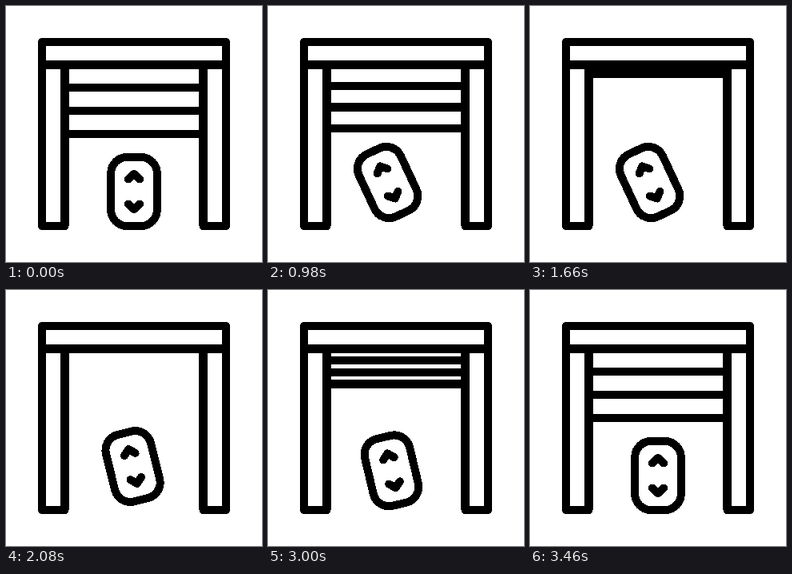
An HTML page for the animation above (3600 ms loop, 320 by 320 pixels).

```html
<!DOCTYPE html>
<html lang="en">
<head>
<meta charset="utf-8">
<title>Garage door</title>
<style>
  html, body { margin: 0; width: 100%; height: 100%; overflow: hidden; background: #fff; }
  svg { display: block; width: 100vw; height: 100vh; }
</style>
</head>
<body>
<svg viewBox="0 0 320 320" fill="none" stroke="#000" stroke-width="10.3" stroke-linecap="round" stroke-linejoin="round" shape-rendering="crispEdges">
  <g id="slats">
    <path d="M73.4 0H246.6"/>
    <path d="M73.4 0H246.6"/>
    <path d="M73.4 0H246.6"/>
  </g>
  <path d="M45 45H275V73.4H45Z"/>
  <path d="M45 73.4H73.4V275H45Z"/>
  <path d="M246.6 73.4H275V275H246.6Z"/>
  <g id="remote" stroke-width="10">
    <rect x="-28.8" y="-43" width="57.6" height="86" rx="20"/>
    <path d="M-7 -15.5L0 -22L7 -15.5M-7 15.5L0 22L7 15.5"/>
  </g>
</svg>
<script>
  const LOOP = 3600, RAIL = 73.4, GAP = 28.8;
  const slats = [...document.querySelectorAll("#slats path")];
  const remote = document.getElementById("remote");

  // Keys: [time, value, value, ...], straight lines between them
  const doorKeys = [[0, 1], [912, 1], [1772, 0], [2523, 0], [3460, 1], [LOOP, 1]];

  const rest = [160, 232, 0], aim = [149.6, 220.5, -25], press = [161.6, 220.5, -10.2];
  const remoteKeys = [
    [0, ...rest], [30, ...rest], [900, ...aim],
    [1820, ...aim], [2170, ...press], [2520, ...aim],
    [2630, ...aim], [3425, ...rest], [LOOP, ...rest]
  ];

  function sample(keys, t) {
    const i = keys.findIndex(k => k[0] > t);
    const a = keys[i - 1], b = keys[i];
    const p = (t - a[0]) / (b[0] - a[0]);
    return a.slice(1).map((v, n) => v + (b[n + 1] - v) * p);
  }

  function draw(t) {
    const [open] = sample(doorKeys, t);
    slats.forEach((s, i) => s.setAttribute("transform", `translate(0 ${RAIL + (i + 1) * GAP * open})`));
    const [x, y, angle] = sample(remoteKeys, t);
    remote.setAttribute("transform", `translate(${x} ${y}) rotate(${angle})`);
  }

  const start = performance.now();
  function tick() {
    draw((performance.now() - start) % LOOP);
    requestAnimationFrame(tick);
  }
  tick();
</script>
</body>
</html>
```
